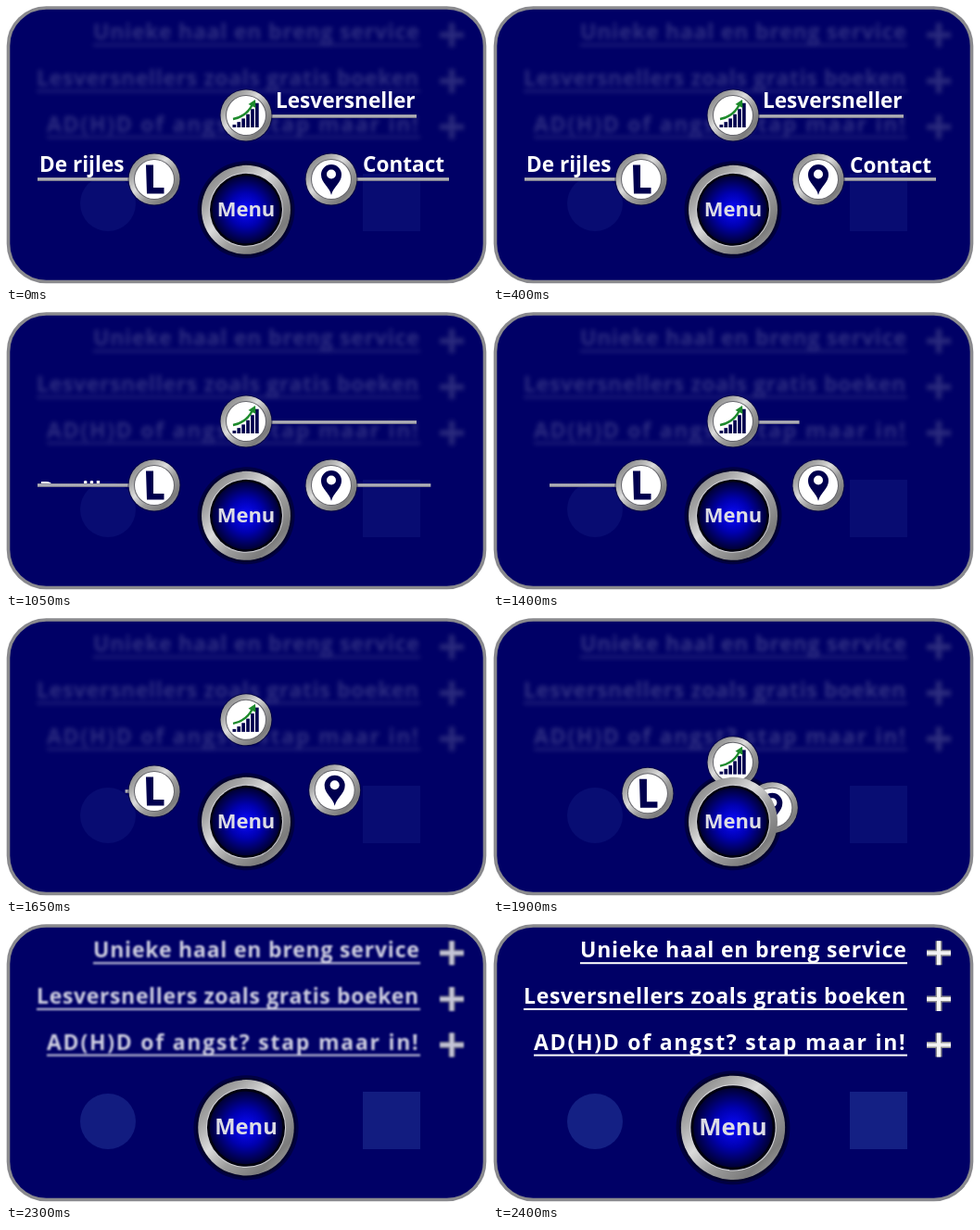
Write an HTML page that moves like this. It is 519 px wide and 300 px high and loops after 2500 ms.

```html
<!DOCTYPE html>
<html lang="nl">
<head>
<meta charset="utf-8">
<title>Menu</title>
<style>
  html, body { margin: 0; width: 100%; height: 100%; overflow: hidden; background: #fff; }
  svg { display: block; width: 519px; height: 300px; }
  text { font-family: "Open Sans", "Noto Sans", sans-serif; font-weight: 700; fill: #fff; }
  .label { font-size: 22.6px; }
  .row { font-size: 23px; }
</style>
</head>
<body>
<svg viewBox="0 0 519 300" xmlns="http://www.w3.org/2000/svg">
  <defs>
    <linearGradient id="silver" x1="0" y1="0" x2="1" y2="1">
      <stop offset="0" stop-color="#707070"/>
      <stop offset=".25" stop-color="#a8a8a8"/>
      <stop offset=".42" stop-color="#dcdcdc"/>
      <stop offset=".6" stop-color="#9c9c9c"/>
      <stop offset=".8" stop-color="#7c7c7c"/>
      <stop offset="1" stop-color="#bcbcbc"/>
    </linearGradient>
    <linearGradient id="bar" x1="0" y1="0" x2="0" y2="1">
      <stop offset="0" stop-color="#77778a"/>
      <stop offset=".45" stop-color="#c2c2c8"/>
      <stop offset="1" stop-color="#66667c"/>
    </linearGradient>
    <radialGradient id="glow">
      <stop offset="0" stop-color="#0a0aff"/>
      <stop offset=".5" stop-color="#0000b0"/>
      <stop offset="1" stop-color="#000034"/>
    </radialGradient>
    <clipPath id="clipTop"><rect x="280" y="80" width="180" height="37"/></clipPath>
    <clipPath id="clipLow"><rect x="20" y="145" width="480" height="40"/></clipPath>
  </defs>

  <rect x="2.5" y="2" width="514" height="295.5" rx="41" fill="#000066" stroke="#8a8a8e" stroke-width="3.6"/>

  <g id="marks" fill="#4064c4">
    <circle cx="110" cy="213" r="30"/>
    <rect x="385" y="181" width="62" height="62"/>
  </g>
  <g id="rows"></g>

  <g clip-path="url(#clipTop)"><text id="textFast" class="label" x="291" y="110">Lesversneller</text></g>
  <g clip-path="url(#clipLow)">
    <text id="textLesson" class="label" x="36" y="179">De rijles</text>
    <text id="textContact" class="label" x="385" y="179">Contact</text>
  </g>
  <rect id="lineFast" y="117" height="4" fill="url(#bar)"/>
  <rect id="lineLesson" y="185" height="4" fill="url(#bar)"/>
  <rect id="lineContact" y="185" height="4" fill="url(#bar)"/>

  <g id="halo" fill="#000020">
    <circle r="52.5" opacity=".5"/>
    <circle r="50" opacity=".7"/>
  </g>

  <g id="discContact">
    <path d="M0 17C-2 8-11 4-11-5a11 11 0 0 1 22 0C11 4 2 8 0 17Z" fill="#00004e"/>
    <circle cy="-5.5" r="5" fill="#fff"/>
  </g>
  <g id="discFast">
    <g id="bars" fill="#00004e"></g>
    <path d="M-14 4Q1 1 7-12" fill="none" stroke="#1d8a2c" stroke-width="2.4"/>
    <path d="M10-17L10.5-8L2.5-12Z" fill="#1d8a2c"/>
  </g>
  <g id="discLesson">
    <path d="M-9-15.5H-1V9H10.5V15.5H-8Z" fill="#00004e"/>
  </g>

  <g id="menu">
    <circle r="48" fill="url(#silver)"/>
    <circle r="40" fill="#d0d0d4"/>
    <circle r="39" fill="#000010"/>
    <circle r="36.5" fill="url(#glow)"/>
    <text y="7" text-anchor="middle" font-size="22" style="fill:#dcdce4">Menu</text>
  </g>
</svg>
<script>
const LOOP = 2500, STEP = 50;
const HUB = [259, 219.8];
const $ = id => document.getElementById(id);
const NS = "http://www.w3.org/2000/svg";

function add(parent, tag, attrs, text, first) {
  const el = document.createElementNS(NS, tag);
  for (const k in attrs) el.setAttribute(k, attrs[k]);
  if (text) el.textContent = text;
  parent.insertBefore(el, first ? parent.firstChild : null);
  return el;
}

// text, left edge, letter spacing
[
  ["Unieke haal en breng service", 94, 0.8],
  ["Lesversnellers zoals gratis boeken", 33, 0.65],
  ["AD(H)D of angst? stap maar in!", 44, 1.75]
].forEach(([text, x, gap], i) => {
  const y = 36.2 + i * 49.7;
  add($("rows"), "text", { class: "row", x, y, "letter-spacing": gap }, text);
  add($("rows"), "rect", { x, y: y + 5, width: 447 - x, height: 2, fill: "#fff" });
  const plus = `M481 ${y - 18}v26M468 ${y - 5}h26`;
  add($("rows"), "path", { d: plus, stroke: "#8c8c90", "stroke-width": 7 });
  add($("rows"), "path", { d: plus, stroke: "#f2f2f2", "stroke-width": 4 });
});

for (let i = 0; i < 6; i++) {
  const h = 3 + i * i * 0.45 + i * 2.4;
  add($("bars"), "rect", { x: -14.5 + i * 4.9, y: 13 - h, width: 3.7, height: h });
}

const items = [
  { id: "Contact", home: [351, 187], drop: 375, fold: 980, leave: 1505, from: 374, to: 478 },
  { id: "Fast", home: [259, 118], drop: 520, fold: 1140, leave: 1565, from: 283, to: 443 },
  { id: "Lesson", home: [160, 187], drop: 690, fold: 1300, leave: 1670, from: 134, to: 34 }
];
for (const it of items) {
  const disc = $("disc" + it.id);
  add(disc, "circle", { r: 21, fill: "#fff" }, "", true);
  add(disc, "circle", { r: 22, fill: "#66666c" }, "", true);
  add(disc, "circle", { r: 27.5, fill: "url(#silver)" }, "", true);
  add(disc, "circle", { r: 28.5, fill: "#00002c", opacity: 0.6 }, "", true);
}

const clamp = v => Math.min(1, Math.max(0, v));

function track(points, t) {
  if (t <= points[0][0]) return points[0][1];
  for (let i = 1; i < points.length; i++) {
    const [t0, v0] = points[i - 1], [t1, v1] = points[i];
    if (t <= t1) return v0 + (v1 - v0) * (t - t0) / (t1 - t0);
  }
  return points[points.length - 1][1];
}

// Discs back off slightly, then run to the hub
const PULL = [[0, 0], [45, -.055], [85, -.08], [145, -.04], [230, .07], [335, .37], [395, .54], [480, .77], [550, 1]];
const SCALE = [[1950, 1], [2150, .94], [2400, 1.17]];

function draw(t) {
  for (const it of items) {
    const fall = 26 * clamp((t - it.drop) / 450);
    $("text" + it.id).setAttribute("transform", `translate(0 ${fall})`);
    $("text" + it.id).style.display = fall < 26 ? "" : "none";

    const end = it.to + (it.from - it.to) * clamp((t - it.fold) / 370);
    const line = $("line" + it.id);
    line.setAttribute("x", Math.min(it.from, end));
    line.setAttribute("width", Math.abs(it.from - end));

    const p = track(PULL, t - it.leave);
    const [x, y] = it.home.map((v, i) => v + (HUB[i] - v) * p);
    const disc = $("disc" + it.id);
    disc.setAttribute("transform", `translate(${x} ${y})`);
    disc.style.display = p < 1 ? "" : "none";
  }
  const k = clamp((t - 1880) / 520);
  $("rows").style.opacity = .18 + .82 * Math.pow(k, 1.2);
  $("rows").style.filter = k < 1 ? `blur(${2.4 * (1 - k * k)}px)` : "none";
  $("marks").style.opacity = .12 + .2 * k;
  for (const id of ["halo", "menu"])
    $(id).setAttribute("transform", `translate(${HUB}) scale(${track(SCALE, t)})`);
}

const start = performance.now();
function tick(now) {
  const t = Math.max(0, now - start) % LOOP;
  draw(Math.floor(t / STEP) * STEP);
  requestAnimationFrame(tick);
}
draw(0);
requestAnimationFrame(tick);
</script>
</body>
</html>
```
